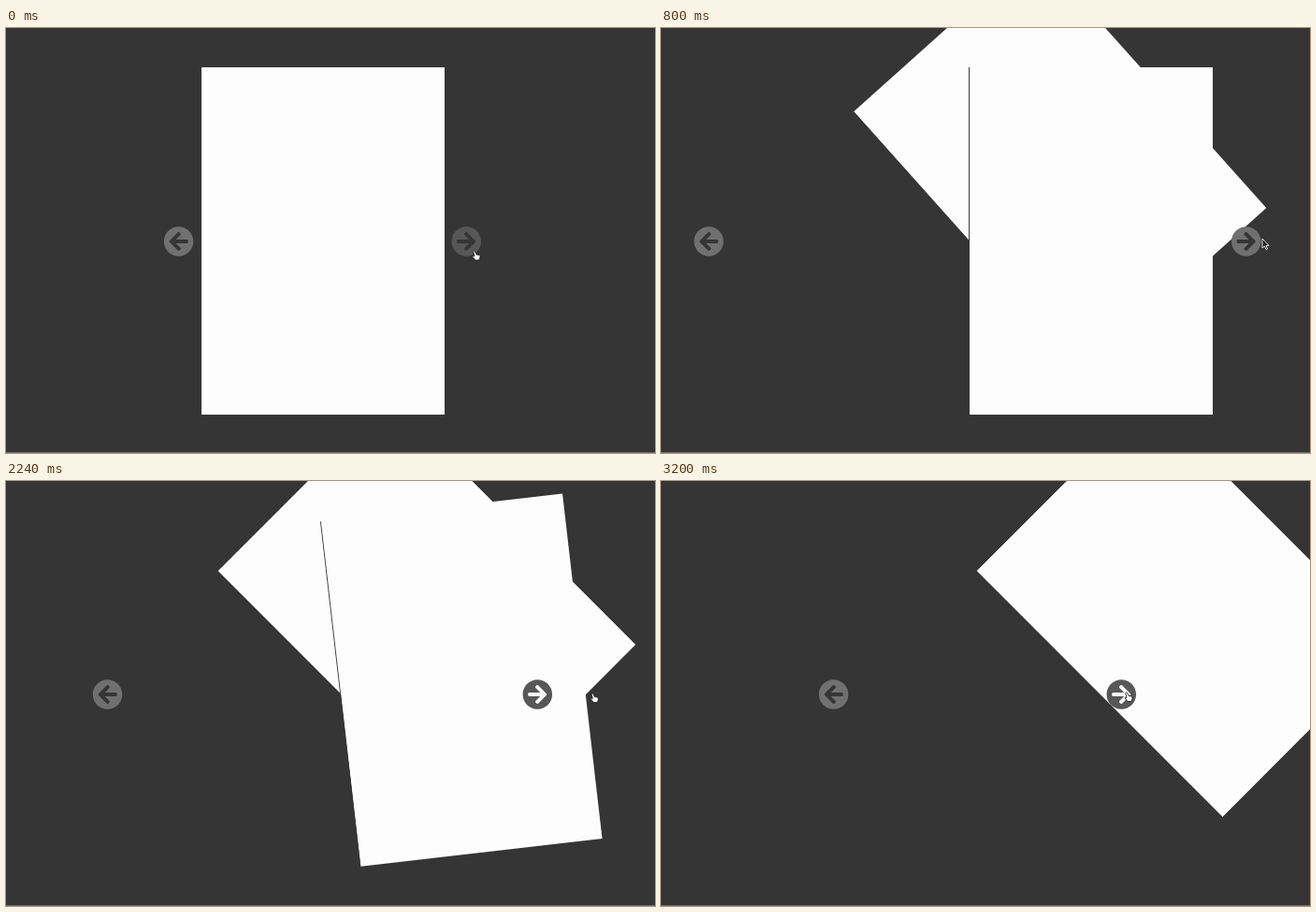
An HTML page with a canvas that plays this animation: 694 px wide and 454 px high, repeating every 3680 ms.

```html
<!DOCTYPE html>
<html lang="en">
<head>
<meta charset="utf-8">
<title>Book flip</title>
<style>
html, body { margin: 0; width: 100%; height: 100%; overflow: hidden; background: #353535; }
canvas { display: block; }
</style>
</head>
<body>
<canvas id="stage" width="694" height="454"></canvas>
<script>
const ctx = document.getElementById('stage').getContext('2d');
const BG = '#353535', PAPER = '#fdfdfd', IDLE = '#707070', HOVER = '#575757';
const LOOP = 3680, LAST = 3200, STEP = 80;
const PAGE_W = 260, PAGE_H = 371, MID_Y = 227.5;
const CLICKS = [124, 1112, 2110];

const arrowIcon = new Path2D('M256 8c137 0 248 111 248 248S393 504 256 504 8 393 8 256 119 8 256 8z' +
  'm-28.9 143.6l75.5 72.4H120c-13.3 0-24 10.7-24 24v16c0 13.3 10.7 24 24 24h182.6l-75.5 72.4' +
  'c-9.7 9.3-9.9 24.8-.4 34.3l11 10.9c9.4 9.4 24.6 9.4 33.9 0L404.3 273c9.4-9.4 9.4-24.6 0-33.9' +
  'L271.6 106.3c-9.4-9.4-24.6-9.4-33.9 0l-11 10.9c-9.5 9.6-9.3 25.1.4 34.4z');
const hand = new Path2D('M-3.3-4Q-2.3-5.6-1.3-4L0-1 3-.6Q4.3 0 4 2L3 5H-1L-4 1.4Q-3.8 0-2 .8Z');
const pointer = new Path2D('M-3-5V5L-.6 3 1 6.5 2.6 5.8 1 2.4H4Z');

// Cursor stops: time, x, y
const stops = [[480, 503, 243], [640, 646, 230], [800, 646, 230], [1040, 629, 231.5],
  [2720, 629.5, 231.5], [3040, 500, 230.5]];

// CSS "ease": cubic-bezier(.25, .1, .25, 1)
function ease(t) {
  if (t <= 0) return 0;
  if (t >= 1) return 1;
  let lo = 0, hi = 1;
  for (let i = 0; i < 24; i++) {
    const s = (lo + hi) / 2;
    if (.75 * s * (1 - s) + s ** 3 < t) lo = s; else hi = s;
  }
  const u = 1 - lo;
  return .3 * u * u * lo + 3 * u * lo * lo + lo ** 3;
}

function at(x, y, draw) {
  ctx.save();
  ctx.translate(x, y);
  draw();
  ctx.restore();
}

function page(spine, turn) {
  at(spine, MID_Y, () => {
    ctx.rotate(-turn * Math.PI / 4);
    ctx.fillStyle = PAPER;
    ctx.fillRect(0, -PAGE_H / 2, PAGE_W, PAGE_H);
    ctx.fillStyle = BG;
    ctx.fillRect(-.8, -PAGE_H / 2, .9, PAGE_H);
  });
}

function button(x, dir, color) {
  at(x, 228, () => {
    ctx.scale(dir / 15.75, 1 / 15.75);
    ctx.translate(-256, -256);
    ctx.fillStyle = color;
    ctx.fill(arrowIcon, 'evenodd');
  });
}

function cursorAt(t) {
  const i = stops.findIndex(s => s[0] > t);
  if (i < 0) return stops[stops.length - 1].slice(1);
  if (i === 0) return stops[0].slice(1);
  const [a, b] = [stops[i - 1], stops[i]];
  const k = (t - a[0]) / (b[0] - a[0]);
  return [a[1] + (b[1] - a[1]) * k, a[2] + (b[2] - a[2]) * k];
}

function cursor(t, hovering) {
  at(...cursorAt(t), () => {
    const shape = hovering ? hand : pointer;
    ctx.lineWidth = .9;
    ctx.strokeStyle = hovering ? '#222' : '#eee';
    ctx.fillStyle = hovering ? '#fff' : '#222';
    ctx.fill(shape);
    ctx.stroke(shape);
  });
}

function draw(t) {
  const turns = CLICKS.map(c => ease((t - c) / 1000));
  const spine = 209 + PAGE_W / 2 * (turns[0] + turns[2]);
  const spread = ease((t - CLICKS[0]) / 500) - ease((t - CLICKS[2]) / 500);
  const hovering = !(t > 480 && t < 960 || t > 2720 && t < 2960);

  ctx.fillStyle = BG;
  ctx.fillRect(0, 0, 694, 454);
  ctx.fillStyle = '#6c6c6c';
  ctx.fillRect(0, 453, 694, 1);

  const order = t < CLICKS[2] ? [0, 2, 1] : [0, 1, 2];
  order.forEach(i => page(spine, turns[i]));
  button(184.6 - 133.5 * spread, -1, IDLE);
  button(492.3 + 133.5 * spread, 1, hovering ? HOVER : IDLE);
  cursor(t, hovering);
}

const start = performance.now();
function tick() {
  const t = (performance.now() - start) % LOOP;
  draw(Math.min(LAST, Math.floor(t / STEP) * STEP));
  requestAnimationFrame(tick);
}
tick();
</script>
</body>
</html>
```
